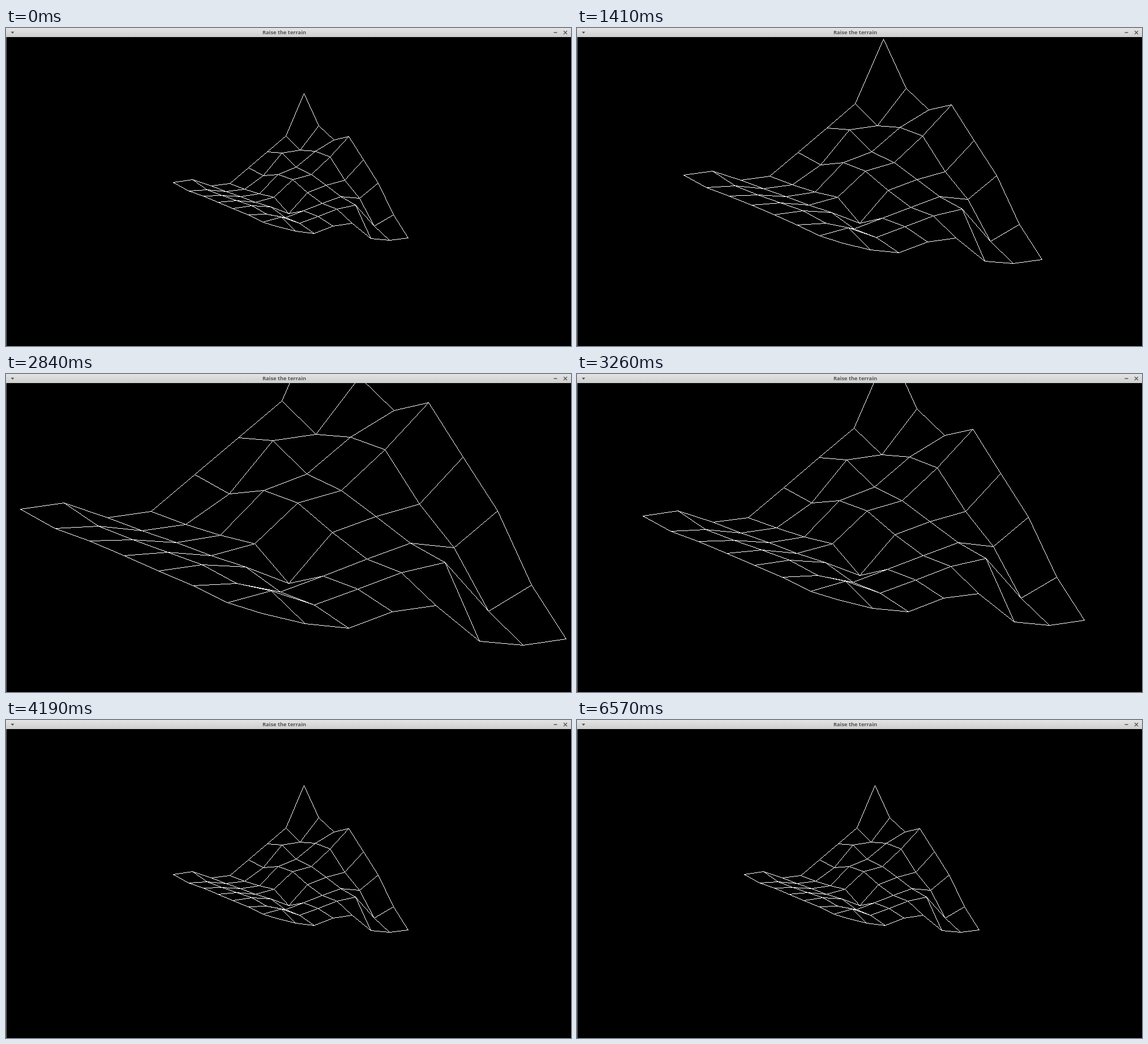
An HTML page with a canvas that plays this animation: 998 by 561 pixels, repeating every 8150 ms.

```html
<!DOCTYPE html>
<html lang="en">
<head>
<meta charset="utf-8">
<title>Raise the terrain</title>
<style>
  html, body { margin: 0; width: 100%; height: 100%; overflow: hidden; background: #000; }
  canvas { position: absolute; left: 0; top: 0; display: block; }
  .edge { position: absolute; left: 0; top: 16px; width: 1px; height: 545px; background: #7c7c7c; }
  .bar {
    position: absolute; left: 0; top: 0; width: 998px; height: 16px;
    background: linear-gradient(#e4e4e4, #cecece);
  }
  .bar span {
    position: absolute; left: 391px; width: 201px; top: 0; text-align: center;
    font: bold 9.25px/16px "Open Sans", "Noto Sans", sans-serif; color: #555;
    white-space: nowrap;
  }
  .bar svg { position: absolute; left: 0; top: 0; }
</style>
</head>
<body>
<canvas id="view" width="998" height="561"></canvas>
<div class="edge"></div>
<div class="bar">
  <span>Raise the terrain</span>
  <svg width="998" height="16">
    <path d="M8.5 6.5h6l-3 3.5z" fill="#505050"/>
    <path d="M967.5 8h6M985 5l6 6m0-6l-6 6" fill="none" stroke="#555" stroke-width="1.4"/>
  </svg>
</div>
<script>
const LOOP = 8150, N = 8, CX = 499, CY = 297, CLOSE = 8;

// Screen heights of the raised grid at zoom level CLOSE, one row per line of points
const raised = [
  [238, 227, 252.5, 242, 177, 111.5, 47, -128],
  [271.5, 267.5, 275.5, 264.5, 210.5, 116.5, 105.5, 4.5],
  [294, 291.5, 297.5, 284, 204.5, 176, 110.5, 63.5],
  [320.5, 314, 320.5, 299.5, 227, 205, 133, 50],
  [347, 336, 340.5, 369, 279, 250.5, 228.5, 146],
  [373.5, 369.5, 384.5, 356, 326.5, 298, 306, 240.5],
  [403.5, 382, 407, 379, 350, 332, 418, 372.5],
  [422, 440.5, 448.5, 419, 408.5, 471, 478, 467]
];

const zoomIn = [900, 1050, 1290, 1410, 1620, 1770, 1920, 2060, 2270];
const zoomOut = [2840, 2990, 3260, 3410, 3620, 3710, 3860, 4070, 4190];
const GROW = { start: 5810, end: 6570, steps: 13, first: 17.4, add: 15.4 };

const ctx = document.getElementById('view').getContext('2d');

const passed = (times, t) => times.filter(x => x <= t).length;
const clamp = (v, m) => Math.max(-m, Math.min(m, v));

function growStep(t) {
  if (t < GROW.start || t >= GROW.end) return GROW.steps;
  return Math.floor((t - GROW.start) / (GROW.end - GROW.start) * GROW.steps);
}

function point(i, j, zoom, limit) {
  const scale = 0.9 ** -zoom;
  const flat = 291.2 - 28.6 * i + 22.9 * j;
  const y = flat + clamp(raised[j][i] - flat, limit);
  return [
    CX + Math.trunc((-204.05 + 33.1 * i + 26.24 * j) * scale),
    CY + Math.trunc((y - CY) * 0.9 ** (CLOSE - zoom))
  ];
}

// Crisp one-pixel line
function line([x0, y0], [x1, y1]) {
  const dx = Math.abs(x1 - x0), dy = Math.abs(y1 - y0);
  const sx = Math.sign(x1 - x0), sy = Math.sign(y1 - y0);
  let err = dx - dy;
  for (;;) {
    ctx.fillRect(x0, y0, 1, 1);
    if (x0 === x1 && y0 === y1) return;
    const e = 2 * err;
    if (e > -dy) { err -= dy; x0 += sx; }
    if (e < dx) { err += dx; y0 += sy; }
  }
}

function draw(zoom, step) {
  const limit = step === GROW.steps ? Infinity : GROW.first + GROW.add * step;
  ctx.fillStyle = '#000';
  ctx.fillRect(0, 0, 998, 561);
  ctx.fillStyle = '#fff';
  for (let j = 0; j < N; j++) {
    for (let i = 0; i < N; i++) {
      const p = point(i, j, zoom, limit);
      if (i + 1 < N) line(p, point(i + 1, j, zoom, limit));
      if (j + 1 < N) line(p, point(i, j + 1, zoom, limit));
    }
  }
}

const begin = performance.now();
let shown = '';

function tick() {
  const t = (performance.now() - begin) % LOOP;
  const zoom = passed(zoomIn, t) - passed(zoomOut, t);
  const step = growStep(t);
  const state = zoom + '/' + step;
  if (state !== shown) {
    draw(zoom, step);
    shown = state;
  }
  requestAnimationFrame(tick);
}
tick();
</script>
</body>
</html>
```
